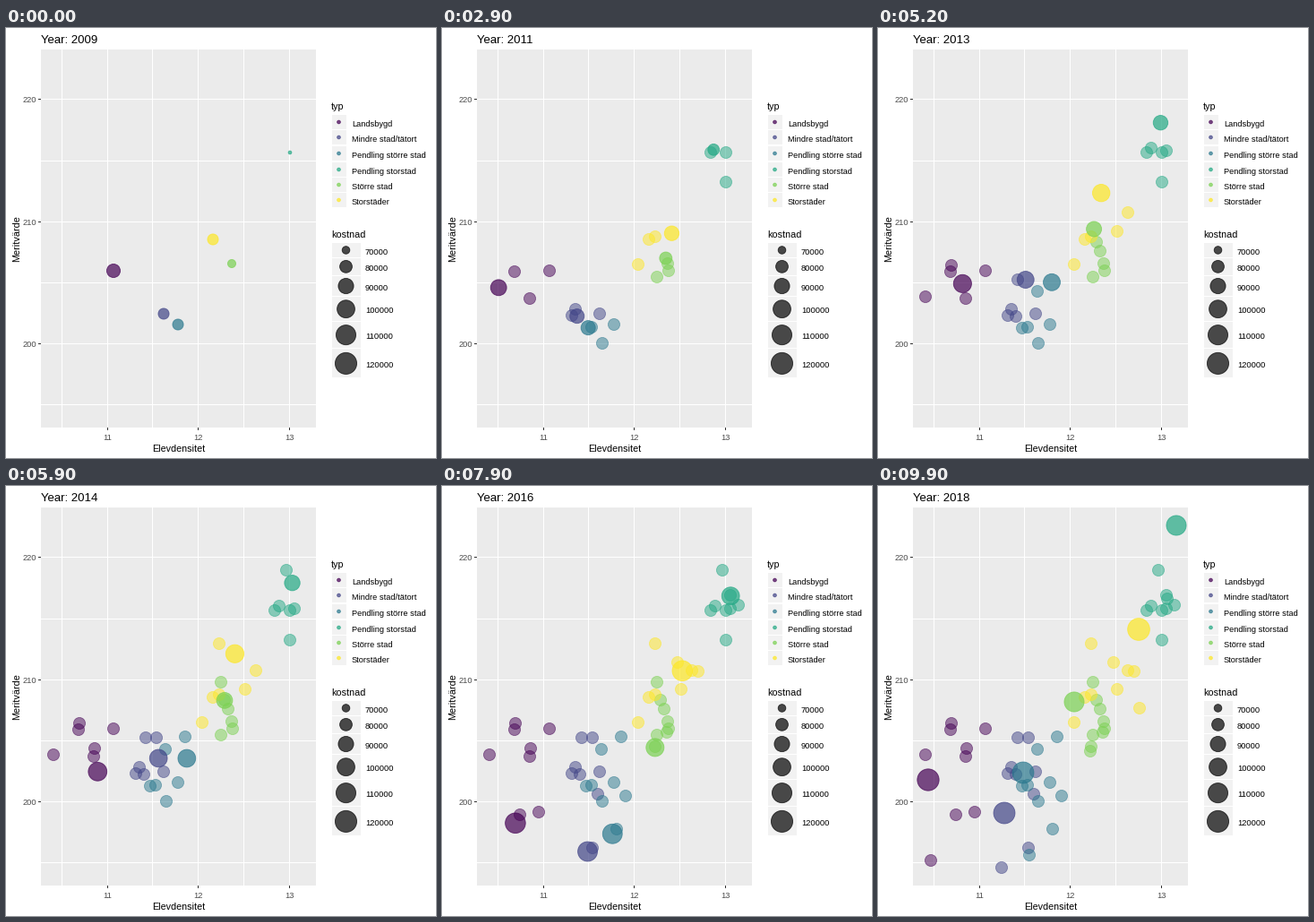
These frames come from a looping animation (480 px wide and 480 px high, 10000 ms). A matplotlib script:

```python
import matplotlib.pyplot as plt
import numpy as np
from matplotlib.animation import FuncAnimation
from matplotlib.colors import to_rgba
from matplotlib.patches import Rectangle

plt.rcParams["font.family"] = "Liberation Sans"

SIDE = 480
STEPS = 11          # frames per year
FIRST_YEAR = 2009
SHADOW_R = 7
GREY = "#F2F2F2"

# Per type: colour, first and last cost, one stop per year on the stage
GROUPS = {
    "Landsbygd": ("#440154", (83500, 121000), [
        (120, 271), (98, 302), (81, 272), (53, 300), (82, 265),
        (99, 293), (108, 364), (87, 367), (59, 418), (56, 328)]),
    "Mindre stad/tätort": ("#414487", (76000, 119000), [
        (176, 319), (149, 314), (145, 321), (154, 322), (156, 281),
        (168, 281), (174, 344), (168, 404), (138, 426), (141, 365)]),
    "Pendling större stad": ("#2A788E", (76000, 119000), [
        (192, 331), (179, 352), (167, 334), (161, 335), (178, 294),
        (200, 280), (205, 346), (195, 383), (169, 412), (162, 320)]),
    "Pendling storstad": ("#22A884", (67000, 110000), [
        (317, 139), (317, 172), (300, 139), (305, 134), (322, 137),
        (313, 94), (331, 133), (322, 122), (323, 126), (333, 44)]),
    "Större stad": ("#7AD151", (70700, 110000), [
        (252, 263), (240, 278), (253, 271), (248, 249), (244, 239),
        (240, 219), (251, 275), (238, 291), (237, 296), (219, 241)]),
    "Storstäder": ("#FDE725", (76000, 123000), [
        (231, 236), (219, 264), (238, 233), (267, 227), (279, 206),
        (238, 176), (286, 207), (263, 197), (292, 248), (291, 160)]),
}

COLORS, COSTS, STOPS = zip(*GROUPS.values())
PATHS = np.array(STOPS, float)
COST_0, COST_1 = np.array(COSTS, float).T
SPAN = PATHS.shape[1] - 1

fig = plt.figure(figsize=(SIDE / 72, SIDE / 72), dpi=72, facecolor="white")
ax = fig.add_axes([0, 0, 1, 1])
ax.set_xlim(0, SIDE)
ax.set_ylim(SIDE, 0)
ax.axis("off")


def rect(x, y, w, h, color):
    ax.add_patch(Rectangle((x, y), w, h, fc=color, lw=0, zorder=0))


def label(x, y, text, size=9.2, color="black", **kw):
    return ax.text(x, y, text, fontsize=size, color=color, **kw)


def radius(cost):
    # Area scale: the square root of the cost sets the radius
    share = (np.asarray(cost) - 67000) / 53000
    return 2.3 + 10.2 * np.sqrt(np.maximum(share, 0))


def areas(r):
    # Half the outline lies outside the marker
    return (2 * np.asarray(r) - 0.9) ** 2


def dots(xy, r, colors, zorder=3):
    x, y = np.reshape(xy, (-1, 2)).T
    return ax.scatter(x, y, s=areas(r), facecolors=colors, edgecolors=colors,
                      linewidths=0.9, zorder=zorder)


def tint(alpha, times=1):
    return [to_rgba(c, alpha) for c in COLORS for _ in range(times)]


# Panel, grid and axes; every second grid line carries a tick
rect(39, 24, 307, 422, "#EBEBEB")
for k in range(6):
    x, y = int(62.4 + 50.75 * k), int(79.85 + 68.2 * k)
    rect(x, 24, 1, 422, "white")
    rect(39, y, 307, 1, "white")
    if k % 2:
        rect(x, 446, 1, 3, "#333333")
        label(x + 0.5, 460, str(11 + k // 2), color="#4D4D4D", ha="center")
    else:
        rect(36, y, 3, 1, "#333333")
        label(34.5, y + 3.8, str(220 - 5 * k), color="#4D4D4D", ha="right")
label(193, 473, "Elevdensitet", 10.7, ha="center")
label(17, 235.5, "Meritvärde", 10.9, rotation=90, ha="right", va="center")
title = label(39, 17, "", 13.2)

# Colour legend
label(363, 91, "typ", 10.7)
rows = np.rint(105 + 17.5 * np.arange(len(GROUPS)))
for y, name in zip(rows, GROUPS):
    rect(364, y - 8, 16, 16, GREY)
    label(386, y + 4.7, name)
dots([(371.5, y) for y in rows], np.full(len(rows), 2.3), tint(0.7))

# Size legend: a row is as tall as its marker needs
label(363, 234, "kostnad", 10.7)
costs = np.arange(70000, 120001, 10000)
heights = np.maximum(17.3, 2.65 * radius(costs))
mids = 239.3 + np.cumsum(heights) - heights / 2
for cost, h, y in zip(costs, heights, mids):
    rect(364, y - h / 2 + 0.5, 32, h - 1, GREY)
    label(401, y + 4.7, str(cost))
dots([(379.5, y) for y in mids], radius(costs),
     [(0, 0, 0, 0.7)] * len(costs))

shadows = dots([], [], [])
movers = dots(PATHS[:, 0], radius(COST_0), tint(0.7), zorder=4)


def update(i):
    year, step = divmod(i, STEPS)
    title.set_text(f"Year: {FIRST_YEAR + year}")

    # Years already passed stay behind as paler marks
    past = year + (step > 0)
    shadows.set_offsets(PATHS[:, :past].reshape(-1, 2))
    shadows.set_sizes([areas(SHADOW_R)])
    shadows.set_facecolors(tint(0.5, past))
    shadows.set_edgecolors(tint(0.5, past))

    a, b = PATHS[:, year], PATHS[:, min(year + 1, SPAN)]
    movers.set_offsets(a + (b - a) * step / STEPS)
    growth = (i / (SPAN * STEPS)) ** 1.15
    movers.set_sizes(areas(radius(COST_0 + (COST_1 - COST_0) * growth)))
    return title, shadows, movers


anim = FuncAnimation(fig, update, frames=SPAN * STEPS + 1, interval=100,
                     repeat=True, repeat_delay=0, blit=False)
plt.show()
```
